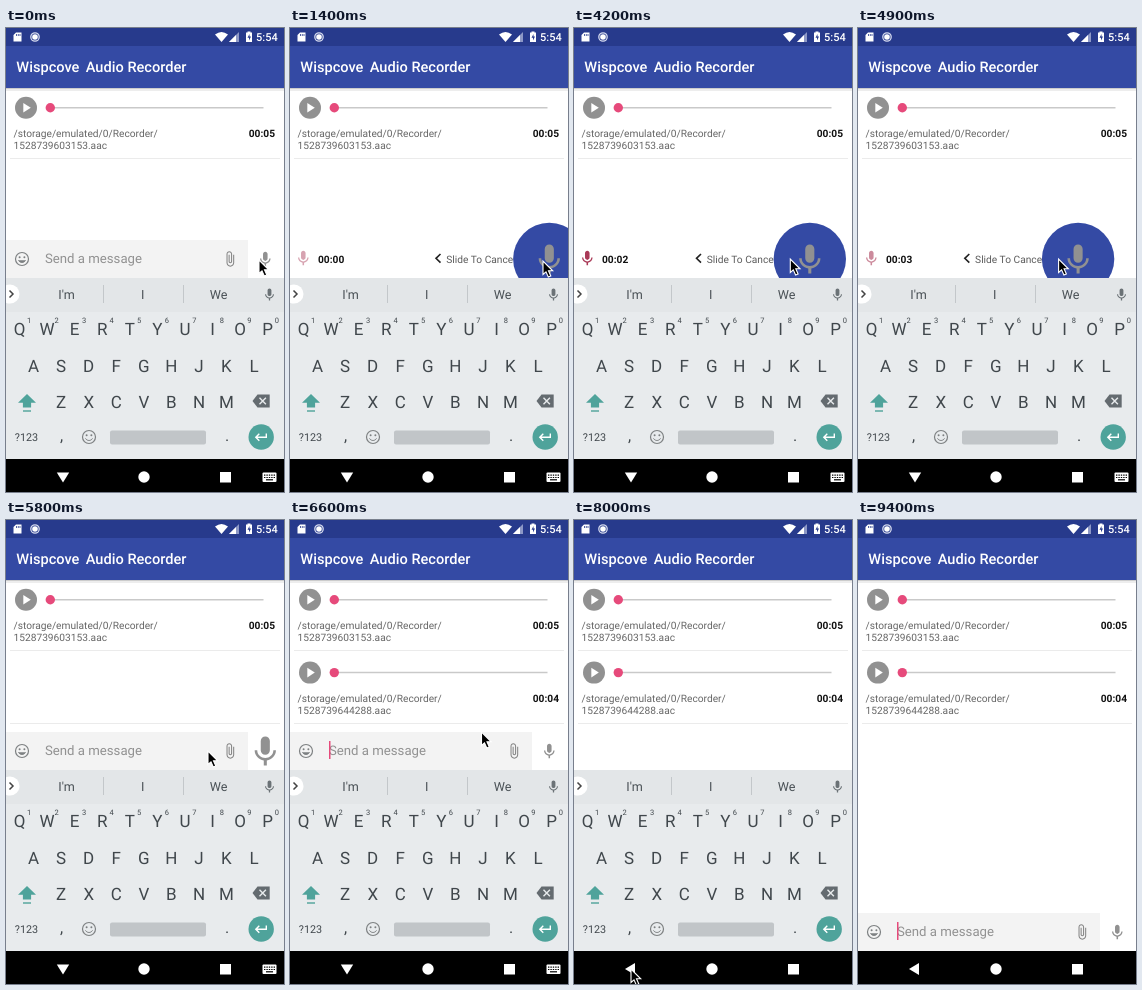
Recreate the animation shown at these times as an HTML page. Size 278 by 464 pixels, loop 9600 ms.

```html
<!DOCTYPE html>
<html lang="en">
<head>
<meta charset="utf-8">
<title>Audio Recorder</title>
<style>
html, body { margin: 0; width: 100%; height: 100%; overflow: hidden; background: #fff; }
svg { display: block; width: 278px; height: 464px; font-family: Roboto, sans-serif; text-rendering: geometricPrecision; }
</style>
</head>
<body>
<svg id="stage" viewBox="0 0 278 464"></svg>
<script>
const BLUE = '#344aa4', GRAY = '#919191', TEAL = '#4fa39b', PINK = '#e64a7b', KEY = '#40474c';
const MIC = 'M12 14c1.66 0 2.99-1.34 2.99-3L15 5c0-1.66-1.34-3-3-3S9 3.34 9 5v6c0 1.66 1.34 3 3 3zm5.3-3c0 3-2.54 5.1-5.3 5.1S6.7 14 6.7 11H5c0 3.41 2.72 6.23 6 6.72V21h2v-3.28c3.28-.48 6-3.3 6-6.72h-1.7z';
const CLIP = 'M16.5 6v11.5c0 2.21-1.79 4-4 4s-4-1.79-4-4V5c0-1.38 1.12-2.5 2.5-2.5s2.5 1.12 2.5 2.5v10.5c0 .55-.45 1-1 1s-1-.45-1-1V6H10v9.5c0 1.38 1.12 2.5 2.5 2.5s2.5-1.12 2.5-2.5V5c0-2.21-1.79-4-4-4S7 2.79 7 5v12.5c0 3.04 2.46 5.5 5.5 5.5s5.5-2.46 5.5-5.5V6h-1.5z';

const rect = (x, y, w, h, fill, more = '') =>
  `<rect x="${x}" y="${y}" width="${w}" height="${h}" fill="${fill}" ${more}/>`;
const circle = (x, y, r, fill, more = '') => `<circle cx="${x}" cy="${y}" r="${r}" fill="${fill}" ${more}/>`;
const path = (d, fill, more = '') => `<path d="${d}" fill="${fill}" ${more}/>`;
const line = (d, color, width, more = '') => path(d, 'none', `stroke="${color}" stroke-width="${width}" ${more}`);
const text = (s, x, y, size, fill, more = '') =>
  `<text x="${x}" y="${y}" font-size="${size}" fill="${fill}" ${more}>${s}</text>`;
const mid = (s, x, y, size, fill) => text(s, x, y, size, fill, 'text-anchor="middle"');
const group = (id, body) => `<g id="${id}">${body}</g>`;
const icon = (d, x, y, scale, fill, cy = 11.5) =>
  path(d, fill, `transform="translate(${x} ${y}) scale(${scale}) translate(-12 ${-cy})"`);
const smiley = (x, y, mouth) => circle(x, y, 6.5, 'none', 'stroke="#7d8082" stroke-width="1.2"') +
  circle(x - 2.4, y - 1.8, 1, '#7d8082') + circle(x + 2.4, y - 1.8, 1, '#7d8082') +
  path(`M${x - 3.6} ${y + 1.3}a4 4 0 0 0 7.2 0`, mouth, 'stroke="#7d8082" stroke-width=".9"');

function recording(y, file, length) {
  return circle(20, y, 11, GRAY) + path(`M17.3 ${y - 4.8}v9.6l7.5-4.8z`, '#fff') +
    line(`M44 ${y}H257.5`, '#c9c9c9', 1.5) + circle(44.3, y, 4.7, PINK) +
    text('/storage/emulated/0/Recorder/', 7.5, y + 29.3, 10.2, '#666') +
    text(file, 7.5, y + 41.3, 10.2, '#666') +
    text(length, 269, y + 29.5, 10.2, '#111', 'text-anchor="end" font-weight="700"');
}

function header() {
  return rect(0, 60, 278, 1, '#000', 'opacity=".2"') + rect(0, 61, 278, 2, '#000', 'opacity=".07"') +
    rect(0, 0, 278, 18, '#273a8c') + rect(0, 18, 278, 42, BLUE) +
    path('M10 4.5h5.5v9h-8v-6.5z', '#fff') + line('M10.5 6v2M12.3 6v2M14 6v2', '#273a8c', .8) +
    circle(29, 9, 4.2, 'none', 'stroke="#d5daee" stroke-width="1.3"') + circle(29, 9, 2.8, '#fff') +
    path('M209 6.6q6.5-5 13 0l-6.5 7.4z', '#fff') +
    path('M233 4v10h-10z', '#8d98c6') + path('M230 7v7h-7z', '#fff') +
    path('M240 4.5h1.5v-1h3v1h1.5v9.5h-6z', '#fff') + path('M243.5 6l-2 3.7h1.5v2.8l2-3.9h-1.5z', '#273a8c') +
    text('5:54', 250, 13, 11, '#fff', 'font-weight="500"') +
    text('Wispcove', 10.3, 44, 14.6, '#fff', 'font-weight="500"') +
    text('Audio Recorder', 180.5, 44, 14.6, '#fff', 'font-weight="500" text-anchor="end"');
}

function keyboard() {
  let s = rect(0, 250, 278, 181, '#e8ebed') + rect(0, 250, 278, 34, '#e3e6e8') +
    circle(4, 266, 9.5, '#fff') + line('M3.5 262.5l3.5 3.5l-3.5 3.5', '#444', 1.5) +
    line('M97.5 257v18M177.5 257v18', '#c3c7ca', 1) + icon(MIC, 263.5, 266.5, .64, '#6b7276');
  ["I'm", 'I', 'We'].forEach((w, i) => s += mid(w, 60.6 + 76 * i, 271, 12.6, '#4a5156'));
  [['QWERTYUIOP', 13.6], ['ASDFGHJKL', 27.6], ['ZXCVBNM', 55.2]].forEach(([keys, x], row) =>
    [...keys].forEach((k, i) => {
      s += mid(k, x + 27.55 * i, 307.2 + 36.3 * row, 17, KEY);
      if (!row) s += mid((i + 1) % 10, x + 9.4 + 27.55 * i, 295, 7.5, KEY);
    }));
  return s + path('M21 366l9 8.8h-4.9v4.7h-8.2v-4.7h-4.9z', TEAL) + rect(17, 382.3, 8, 1.4, TEAL) +
    path('M246.5 373l5-6.5h12.2v13h-12.2z', '#646b70') + line('M253.5 369.8l6.4 6.4M259.9 369.8l-6.4 6.4', '#e8ebed', 1.4) +
    mid('?123', 20.5, 413, 10.8, KEY) + mid(',', 55.5, 413, 16, KEY) + smiley(83, 409, 'none') +
    rect(104, 402.5, 96, 14, '#c1c5c8', 'rx="2"') + mid('.', 221, 413, 16, KEY) +
    circle(255.2, 409, 12.7, TEAL) + line('M260.3 405.5v3.8h-10M253.3 405.8l-3.5 3.5l3.5 3.5', '#fff', 1.4);
}

function navBar() {
  return rect(0, 431, 278, 33, '#000') + circle(138, 449, 5.7, '#fff') + rect(214, 444, 11, 10.5, '#fff') +
    group('navOpen', path('M50.8 444.5h12.4l-6.2 10z', '#fff') + rect(256.5, 444.5, 14, 9.5, '#fff', 'rx="1"') +
      line('M258 447.2h11M258 449.5h11', '#000', 1.2, 'stroke-dasharray="1.4 1"') + rect(260, 451.2, 7, 1.2, '#000')) +
    group('navShut', path('M51 449l10-6v12z', '#fff'));
}

stage.innerHTML = rect(0, 0, 278, 464, '#fff') +
  recording(79.8, '1528739603153.aac', '00:05') + line('M4 130.5H274', '#ebebeb', 1) +
  group('second', recording(152.6, '1528739644288.aac', '00:04')) +
  group('divider', line('M4 203.5H274', '#ebebeb', 1)) + header() +
  group('inputBar', rect(0, 212, 242, 38, '#f3f3f3') + smiley(16, 231, '#7d8082') +
    text('Send a message', 39, 235, 13.2, GRAY) + icon(CLIP, 224, 231, .7, '#858585', 12) +
    group('caret', rect(39, 221, 1.5, 18, PINK))) +
  group('recordBar', group('redMic', icon(MIC, 13.3, 230, .76, '#a5304f')) +
    text('00:00', 28, 234.5, 10.2, '#111', 'id="timer" font-weight="700"') +
    group('hint', line('M150.5 226l-4.5 4.3l4.5 4.3', '#222', 1.6) +
      text('Slide To Cancel', 156.3, 234.5, 10.2, '#5c5c5c'))) +
  group('button', group('disc', circle(0, 0, 18.1, BLUE)) + icon(MIC, 0, 0, .76, GRAY)) +
  group('keys', keyboard()) + navBar() +
  group('pointer', path('M0 0V13.5L3 10.8L5.3 16L7.8 14.9L5.5 9.8H9.7Z', '#000', 'stroke="#fff" stroke-width="1.1"'));

const LOOP = 9600, PRESS = 1150, RELEASE = 5800, HIDE = 8000;
const BLINKS = [100, 600, 6300, 6800, 7300, 7800, 8300, 8800, 9400];
// time, x, y of the pointer tip
const TRACK = [
  [0, 253, 232], [300, 253, 232], [700, 257, 233], [1150, 254, 233], [1400, 253, 233], [1850, 257, 233],
  [2300, 257, 233], [2700, 257, 233], [3300, 250, 232], [3700, 246, 232], [4200, 216.3, 231], [4700, 201, 231],
  [5200, 200, 231], [5700, 202, 231], [6500, 202, 231], [6900, 160, 155], [7400, 62, 428],
  [7500, 58, 447], [7700, 57, 449], [8200, 57, 449], [8500, 50, 466], [LOOP, 50, 466]
];

const clamp = v => Math.max(0, Math.min(1, v));
const ease = v => .5 - .5 * Math.cos(Math.PI * clamp(v));
const show = (el, on) => el.setAttribute('visibility', on ? 'inherit' : 'hidden');
const move = (el, x, y, scale = 1) => el.setAttribute('transform', `translate(${x} ${y}) scale(${scale})`);

function pointerAt(t) {
  const i = TRACK.findIndex(k => k[0] > t), [t0, x0, y0] = TRACK[i - 1], [t1, x1, y1] = TRACK[i];
  const p = (t - t0) / (t1 - t0);
  return [x0 + (x1 - x0) * p, y0 + (y1 - y0) * p];
}

function draw(t) {
  const live = t >= PRESS && t < RELEASE, open = t < HIDE;
  const [px, py] = pointerAt(t);
  const slide = live ? Math.min(0, px + 19.2 - 259) : 0;
  const drop = open ? 0 : 181;
  const grow = ease((t - PRESS) / 150) - ease((t - RELEASE) / 200);

  show(inputBar, !live);
  show(recordBar, live);
  show(disc, live);
  show(caret, !live && BLINKS.filter(b => b <= t).length % 2);
  show(divider, t >= RELEASE);
  second.setAttribute('opacity', clamp((t - RELEASE) / 200));
  redMic.setAttribute('opacity', .5 + .5 * Math.cos((t - 3130) / 500 * Math.PI));
  timer.textContent = '00:0' + Math.max(0, Math.floor((t - 1250) / 1000));

  move(inputBar, 0, drop);
  move(hint, slide, 0);
  move(button, 259.3 + slide, 231 + drop, 1 + grow);
  move(keys, 0, 182 * ease((t - HIDE) / 300));
  show(navOpen, open);
  show(navShut, !open);
  move(pointer, px, py);
}

// the picture advances ten times a second
function tick() {
  draw(Math.floor(performance.now() % LOOP / 100) * 100);
  requestAnimationFrame(tick);
}
tick();
</script>
</body>
</html>
```
